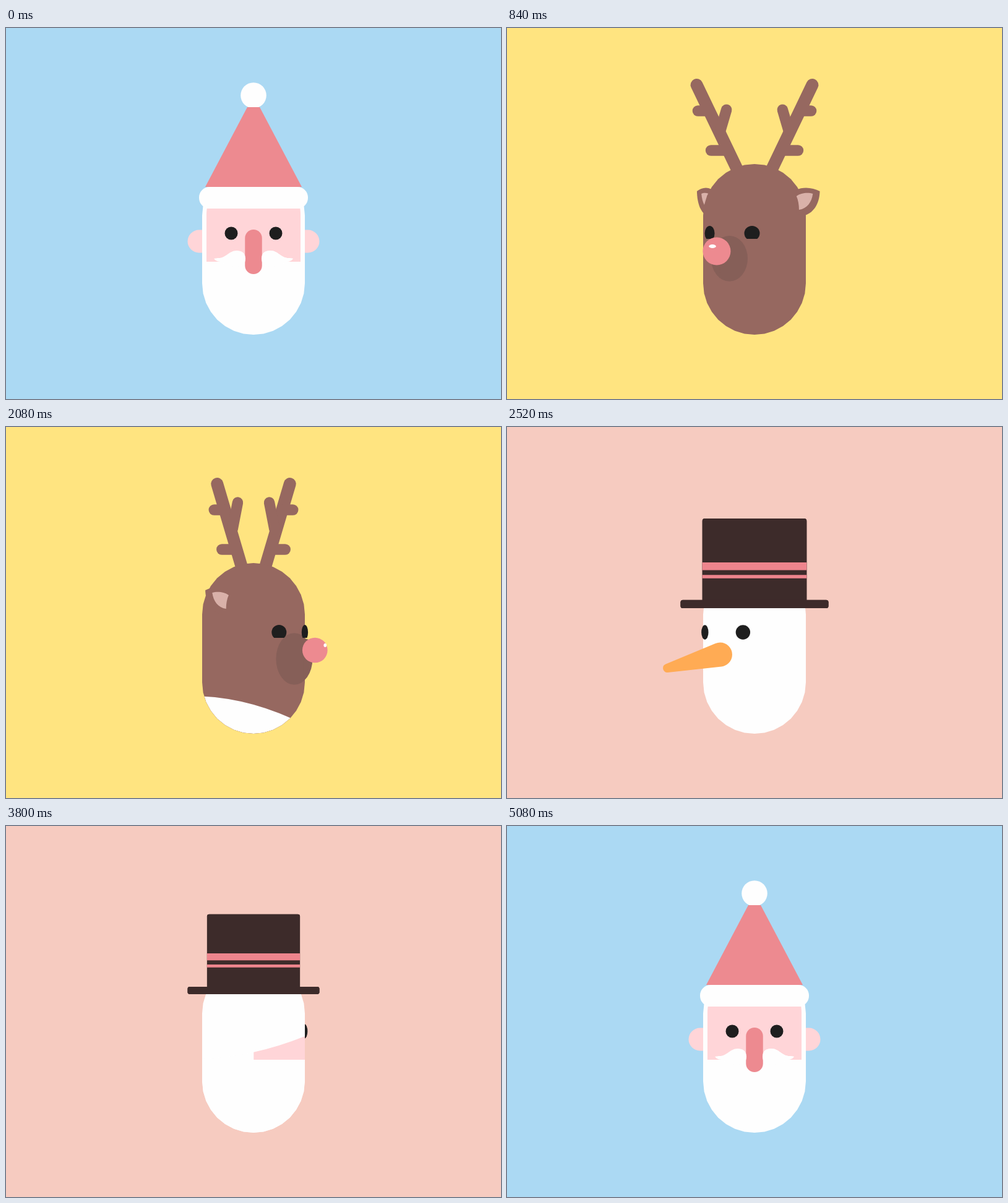
Animation, 800 px wide and 600 px high, one loop 5160 ms. Source, as an HTML page with a canvas:

```html
<!DOCTYPE html>
<html>
<head>
<meta charset="utf-8">
<title>Spinning winter heads</title>
<style>
html, body { margin: 0; width: 100%; height: 100%; overflow: hidden; }
canvas { display: block; width: 800px; height: 600px; }
</style>
</head>
<body>
<canvas id="stage" width="800" height="600"></canvas>
<script>
const ctx = document.getElementById('stage').getContext('2d');
const LOOP = 5160, SPIN_OUT = 600, SPIN_IN = 960;
const R = 83, MID = 400, TOP = 303, LOW = 413, RAD = Math.PI / 180;
const WHITE = '#fefefe', RED = '#ed8a90', SKIN = '#ffd5d8', BROWN = '#966860',
  MUZZLE = '#865f58', INNER = '#d9b1a9', FELT = '#3d2b2a', BLACK = '#1e1e1e', ORANGE = '#ffab54';
const { sin, cos, abs, min, max, sign, sqrt, PI } = Math;
const clamp = v => min(1, max(0, v));
const smooth = v => (v = clamp(v), v * v * (3 - 2 * v));

function fill(color, path) {
  ctx.fillStyle = color;
  if (path) ctx.fill(path); else ctx.fill();
}
function ellipse(x, y, rx, ry, color) {
  ctx.beginPath();
  ctx.ellipse(x, y, max(0, rx), max(0, ry), 0, 0, 2 * PI);
  fill(color);
}
function rect(x, y, w, h, r, color) {
  ctx.beginPath();
  ctx.roundRect(x, y, w, h, r);
  fill(color);
}
function polygon(points, color) {
  ctx.beginPath();
  points.forEach(p => ctx.lineTo(p[0], p[1]));
  fill(color);
}
function line(x1, y1, x2, y2, w) {
  ctx.lineWidth = w;
  ctx.beginPath();
  ctx.moveTo(x1, y1);
  ctx.lineTo(x2, y2);
  ctx.stroke();
}
// Convex hull of two circles.
function taper(x1, y1, r1, x2, y2, r2, color) {
  const d = Math.hypot(x2 - x1, y2 - y1);
  if (d <= abs(r1 - r2)) return ellipse(x1, y1, r1, r1, color);
  const a = Math.atan2(y2 - y1, x2 - x1), o = Math.acos((r1 - r2) / d);
  ctx.beginPath();
  ctx.arc(x1, y1, r1, a + o, a - o + 2 * PI);
  ctx.arc(x2, y2, r2, a - o, a + o);
  fill(color);
}
function placed(x, y, sx, sy, draw) {
  ctx.save();
  ctx.translate(x, y);
  ctx.scale(sx, sy);
  draw();
  ctx.restore();
}

// The head is a capsule with 32-sided ends.
const headPath = new Path2D();
for (let i = 0; i < 34; i++) {
  const a = (i < 17 ? i : i - 1) * PI / 16;
  headPath.lineTo(MID + R * cos(a), (i < 17 ? LOW : TOP) + R * sin(a));
}
headPath.closePath();

const earOuter = new Path2D('M-5 262C12 256 34 258 50 264C49 285 35 300 11 304L-5 300Z');
const earInner = new Path2D('M-4 272C7 266 24 266 34 268C31 282 21 292 2 294C2 286 0 278-4 272Z');
const whisker = new Path2D('M13 373C13 363 20 360 27 360C40 360 45 373 58 372L64 373' +
  'C61 377 57 378 52 378C44 384 38 386 28 386C18 386 13 382 13 373Z');

function eye(yaw, deg, y, r, ry, front, cut) {
  const a = yaw + deg * RAD;
  if ((cos(a) > 0) !== front) return;
  ctx.save();
  if (cut) {
    ctx.beginPath();
    ctx.rect(0, 0, 800, cut);
    ctx.clip();
  }
  ellipse(MID + R * sin(a), y, r * min(1, sqrt(cos(a) ** 2 + .17)), ry, BLACK);
  ctx.restore();
}

function santaEar(yaw, side, front) {
  const a = yaw + side * PI / 2, s = abs(sin(a)), c = cos(a);
  if ((c > 0) !== front) return;
  const outer = R * s + 23.5 * s * s, inner = R * s - 12 * max(0, c);
  const rx = 18.5 * s ** 1.5, ry = 18.5 - 5.6 * abs(c);
  placed(MID, 345, sign(sin(a)) || 1, 1, () => {
    ctx.beginPath();
    ctx.moveTo(inner, -ry);
    ctx.lineTo(outer - rx, -ry);
    ctx.ellipse(outer - rx, 0, rx, ry, 0, -PI / 2, PI / 2);
    ctx.lineTo(inner, ry);
    fill(SKIN);
  });
}

function halfMoustache(yaw, side) {
  const c = cos(yaw), s = sin(yaw);
  placed(MID + 92.5 * s, 0, side * c - .176 * s, 1, () => fill(WHITE, whisker));
}

function face(yaw, q) {
  const a = max(-PI / 2, yaw - 66.3 * RAD), b = min(PI / 2, yaw + 66.3 * RAD);
  if (a >= b) return;
  const top = 292 - 26 * q, left = [], right = [];
  for (let i = 0; i <= 8; i++) {
    const y = top + (TOP - top) * i / 8, r = sqrt(R * R - (TOP - y) ** 2);
    left.push([MID + r * sin(a), y]);
    right.unshift([MID + r * sin(b), y]);
  }
  polygon([...left, [MID + R * sin(a), 378], [MID + R * sin(b), 378], ...right], SKIN);
}

const santa = {
  bg: '#abd9f3', skin: WHITE, enter: 4000, leave: 0, power: 2.2,
  squeeze: u => min(1, (1.5 * max(0, 1 - u / 600)) ** 3),
  face,
  features(yaw, front) {
    santaEar(yaw, -1, front);
    santaEar(yaw, 1, front);
    eye(yaw, -25.7, 332, 10.6, 10.5, front);
    eye(yaw, 25.7, 332, 10.6, 10.5, front);
    if ((cos(yaw) > 0) !== front) return;
    const far = yaw < 0 ? -1 : 1;
    const w = 27.5 * sqrt(cos(yaw) ** 2 + .3 * sin(yaw) ** 2);
    halfMoustache(yaw, far);
    rect(MID + R * sin(yaw) - w / 2, 326, w, 72, w / 2, RED);
    halfMoustache(yaw, -far);
    if (abs(yaw) < .2) halfMoustache(yaw, far);
  },
  hat(yaw, q) {
    const s = 1 - .16 * q;
    placed(MID, 257 - 10.5 * q, s, s, () => {
      ellipse(0, -148, 20.8, 20.8, WHITE);
      rect(-88, 0, 176, 35, 17, WHITE);
      polygon([[-10, -129], [10, -129], [78, 0], [-78, 0]], RED);
    });
  }
};

function deerEar(yaw, side, front) {
  const a = yaw + side * PI / 2, c = cos(a);
  if ((c > -.001) !== front) return;
  const s = 1 - .3 * min(1, 1.9 * abs(sin(yaw))) - (c < 0 ? .25 * min(1, -1.9 * c) : 0);
  const turn = max(-1, min(1, 4 * sin(a)));
  placed(MID + R * sin(a), 0, s * turn, 1, () => {
    fill(BROWN, earOuter);
    fill(INNER, earInner);
  });
}

function antler(c, side) {
  const tip = 5 + 104 * c, base = 3.5 + 28 * c;
  const at = y => tip + (base - tip) * (y - 92) / 136;
  placed(MID, 0, side, 1, () => {
    ctx.strokeStyle = BROWN;
    ctx.lineCap = 'round';
    line(tip, 92, base, 230, 20);
    line(at(134), 134, at(134) + 16 + 3 * c, 134, 17.5);
    line(at(198), 198, at(198) + 17.5 + 13 * c, 198, 17.5);
    const y = 106.3 + 30.5 * c;
    line(at(y) - 17.5 - 13 * c, y, at(165) - 3, 165, 17.5);
  });
}

const deer = {
  bg: '#ffe480', skin: BROWN, enter: 600, leave: 1720, power: 2.2,
  squeeze: () => 0,
  features(yaw, front) {
    if (!front) {
      antler(abs(cos(yaw)), -1);
      antler(abs(cos(yaw)), 1);
    }
    deerEar(yaw, -1, front);
    deerEar(yaw, 1, front);
    const c = cos(yaw), s = sin(yaw);
    const nose = () => {
      const mx = MID + 77 * s, my = 362 + 13 * min(1, 1.6 * abs(s)), ry = 29 + 15 * abs(s);
      const nx = MID + 116 * s, r = 17 + 6.5 * c, d = sign(s);
      ellipse(mx, my, 29.5, ry, MUZZLE);
      polygon([[mx + 15 * d, my + ry * .73], [nx - 3 * d, 376],
        [nx - 3 * d, 346], [mx + 15 * d, my - ry * .8]], MUZZLE);
      eyes();
      ellipse(nx, 361, r, r, RED);
      const g = yaw + 9 * RAD;
      if (cos(g) > 0) ellipse(nx + 17.8 * sin(g), 353, 6.3 * cos(g), 3, WHITE);
    };
    const eyes = () => [-29, 29].forEach(d => eye(yaw, d, 332, 12.5, 12, front, 341));
    if ((c > 0) === front) nose(); else eyes();
  },
  hat() {}
};

const snowman = {
  bg: '#f6cbc0', skin: WHITE, enter: 2320, leave: 3400, power: 2.47,
  squeeze: u => max(0, 1 - u / 333) ** 2,
  features(yaw, front, out) {
    const k = clamp((380 - out) / 200);
    eye(yaw, -31, 332, 11.7 * k, 11.7 * k, front);
    eye(yaw, 31, 332, 11.7, 11.7, front);
    if ((cos(yaw) > 0) !== front || !k) return;
    const s = sin(yaw), z = 80 + 123 * k;
    taper(MID + 80 * s, 368, 19.5 * k, MID + z * s, 368 + 22 * k, 7 * k, ORANGE);
  },
  hat(yaw, q) {
    const s = 1 - .127 * q;
    placed(MID, 297 - 25 * q, s, s, () => {
      rect(-86, -148, 172, 140, 4, FELT);
      rect(-86, -75.5, 172, 12.7, 0, '#ee858d');
      rect(-86, -55, 172, 5.6, 0, '#ee858d');
      rect(-122, -13.7, 244, 13.7, 4, FELT);
    });
  }
};

// The next head rises inside the current one like a tilting liquid.
function wave(next, yaw, out) {
  const e = smooth((out - 312) / 190);
  if (!e) return;
  const level = 497 - 290 * e;
  const m = .04 + .26 * cos(clamp((out - 355) / 45) * PI);
  const bow = m * .005 * R * R;
  ctx.save();
  ctx.clip(headPath);
  ctx.beginPath();
  ctx.moveTo(MID - R, level - R * m + bow);
  ctx.quadraticCurveTo(MID, level - bow, MID + R, level + R * m + bow);
  ctx.lineTo(MID + R, 500);
  ctx.lineTo(MID - R, 500);
  ctx.clip();
  fill(next.skin, headPath);
  if (next.face) next.face(yaw, 1);
  ctx.restore();
}

function render(t) {
  const [cur, next] = t < 600 || t >= 4000 ? [santa, deer] : t < 2320 ? [deer, snowman] : [snowman, santa];
  const leaving = cur === santa ? t < 600 : t >= cur.leave;
  const out = leaving ? t - cur.leave : 0, into = t - cur.enter;
  const yaw = leaving
    ? PI * (out / SPIN_OUT) ** cur.power
    : -PI * max(0, 1 - into / SPIN_IN) ** 6;
  const q = cur === deer ? 0 : leaving ? smooth(out / 380) : cur.squeeze(into);

  ctx.fillStyle = cur.bg;
  ctx.fillRect(0, 0, 800, 600);
  cur.features(yaw, false, out);
  fill(cur.skin, headPath);
  cur.hat(yaw, q);
  if (cur.face) {
    ctx.save();
    ctx.clip(headPath);
    cur.face(yaw, q);
    ctx.restore();
  }
  cur.features(yaw, true, out);
  wave(next, yaw, out);
  if (cur === snowman) cur.hat(yaw, q);
}

const begin = performance.now();
function tick() {
  render((performance.now() - begin) % LOOP);
  requestAnimationFrame(tick);
}
tick();
</script>
</body>
</html>
```
